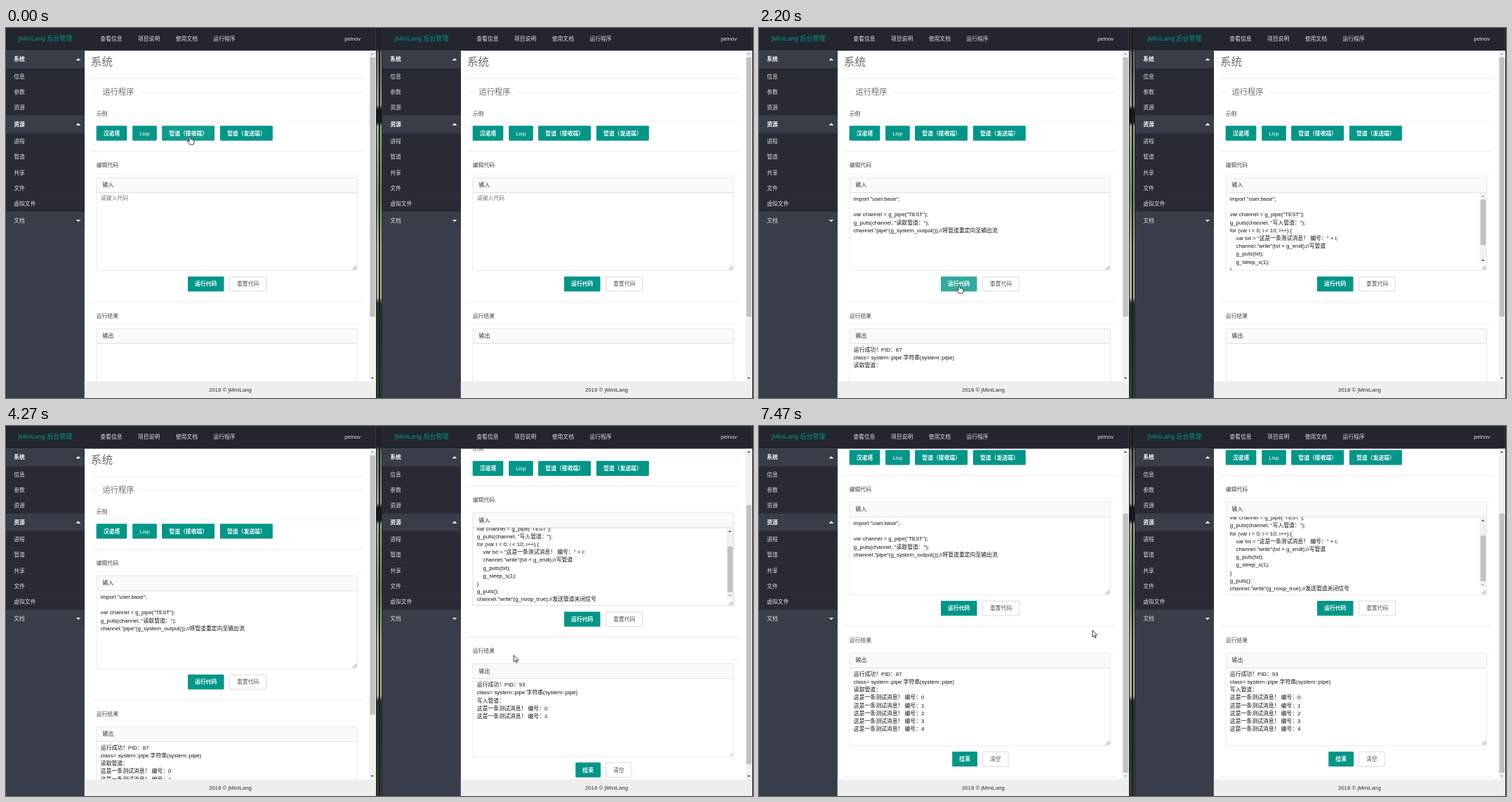
Recreate the animation shown at these times as an HTML page. Size 1064 by 527 pixels, loop 8 s.

```html
<!DOCTYPE html>
<html lang="zh-CN">
<head>
<meta charset="utf-8">
<title>jMiniLang 后台管理</title>
<style>
html, body { margin: 0; width: 100%; height: 100%; overflow: hidden; background: #17191d; }
#stage { position: relative; width: 1064px; height: 527px; overflow: hidden; }
#stage div, #stage pre { position: absolute; box-sizing: border-box; margin: 0; white-space: pre; }
.panel { top: 0; width: 942px; height: 945px; overflow: hidden; background: #fff; transform-origin: 0 0;
  font: 14px/20px "Liberation Sans", Arial, "Noto Sans CJK SC", "Noto Sans CJK", sans-serif; color: #333; }
.head { width: 942px; height: 60px; background: #23262e; color: #dfe0e2; line-height: 60px; }
.logo { width: 200px; text-align: center; font-size: 16px; color: #009688; }
.side { top: 60px; width: 200px; height: 885px; background: #393d49; color: #dcdde0; }
.side div { width: 200px; padding-left: 20px; line-height: 40px; height: 40px; background: #282b33; }
.side .top { height: 45px; line-height: 45px; background: #393d49; }
.side .open { color: #fff; font-weight: bold; }
.top::after { content: ""; position: absolute; left: 178px; top: 20px; border: 6px solid transparent; border-top-color: #dcdde0; }
.open::after { top: 13px; border-color: transparent transparent #fff; }
.body { left: 200px; top: 60px; width: 742px; height: 842px; overflow: hidden; }
.page { width: 725px; height: 1030px; }
.line { left: 15px; width: 695px; height: 1px; background: #dedede; }
.faint { background: #ececec; }
.h1 { left: 16px; top: 10px; font-size: 28px; line-height: 40px; font-weight: 300; color: #6c6c6c; }
.legend { left: 36px; top: 90px; padding: 0 10px; font-size: 20px; line-height: 30px; font-weight: 300; color: #6c6c6c; background: #fff; }
.title { left: 30px; line-height: 42px; color: #444; }
.label { left: 30px; width: 665px; height: 39px; padding-left: 15px; line-height: 37px; background: #fafafa; border: 1px solid #dcdcdc; }
.area { left: 30px; width: 665px; height: 199px; overflow: hidden; border: 1px solid #dcdcdc; }
.area pre { left: 10px; top: 5px; font: inherit; color: #111; }
.area pre.hint { top: 4px; color: #757575; }
.grip { right: 1px; bottom: 1px; width: 11px; height: 11px;
  background: linear-gradient(135deg, transparent 49%, #888 49% 57%, transparent 57% 72%, #888 72% 80%, transparent 80%); }
.btn { height: 38px; line-height: 38px; border-radius: 2px; text-align: center; background: #009688; color: #fff; font-weight: bold; }
.plain { background: #fff; color: #555; font-weight: normal; border: 1px solid #bdbdbd; line-height: 36px; }
.latin { font-weight: normal; }
.bar { width: 17px; background: #f1f1f1; }
.thumb { left: 2px; top: 17px; width: 13px; background: #c1c1c1; }
.up, .down { left: 4px; border: 4.5px solid transparent; }
.up { top: 2px; border-bottom-color: #444; }
.down { bottom: 2px; border-top-color: #444; }
.up.off { border-bottom-color: #a3a3a3; }
.down.off { border-top-color: #a3a3a3; }
.foot { left: 200px; top: 902px; width: 742px; height: 44px; line-height: 44px; text-align: center; background: #eee; }
#gap { left: 527px; width: 9px; height: 527px; background:
  linear-gradient(90deg, #15171a 0 1px, transparent 1px 4px, #1b1e1c 4px 6px, transparent 6px 8px, #24272d 8px),
  linear-gradient(#23262e 0 30px, #6d7068 34px, #9a9b94 110px, #121512 116px 134px, #a3aa8c 140px, #7e8a66 240px, #b4b894 310px 384px, #2b302c 392px, #3a3f3b 100%); }
#cursor { position: absolute; left: 0; top: 0; overflow: visible; }
#cursor path { display: none; fill: #fff; stroke: #111; stroke-width: .8; stroke-linejoin: round; }
</style>
</head>
<body>
<div id="stage">
  <div id="gap"></div>
  <svg id="cursor" width="1" height="1">
    <path id="arrow" d="M0 0V9.4L2.2 7.4L3.7 10.8L5.1 10.2L3.6 6.9H6.6Z"/>
    <path id="beam" style="fill:none" d="M-2.4 -5.5H-.6L0 -5L.6 -5.5H2.4M0 -5V5M-2.4 5.5H-.6L0 5L.6 5.5H2.4"/>
    <path id="hand" d="M-1 .9Q0 -.6 1 .9V4.5L2.6 4.8L4.4 5.3L6 6.1V9L5 12H-.6L-3.8 7.8Q-3.6 6.2 -2.2 6.9L-1 8Z"/>
  </svg>
</div>
<script>
const LOOP = 8000, FPS = 15, SCALE = 0.5594, PAGE_MAX = 187.7, AREA_MAX = 54;
const stage = document.getElementById('stage');
const cursor = document.getElementById('cursor');

const box = (cls, text = '', style = '', key = '') =>
  `<div class="${cls}" style="${style}" data-key="${key}">${text}</div>`;
const btn = (text, x, y, w, cls = '', key = '') =>
  box('btn ' + cls, text, `left:${x}px;top:${y}px;width:${w}px`, key);
const line = (y, cls = '') => box('line ' + cls, '', `top:${y}px`);
const bar = (key, x, h, thumb) => box('bar',
  box('up') + box('thumb', '', `height:${thumb}px`) + box('down'), `left:${x}px;top:0;height:${h}px`, key);

function card(y, title, label, key) {
  return line(y) + box('title', title, `top:${y + 15}px`) + line(y + 57, 'faint') +
    box('label', label, `top:${y + 68}px`) +
    box('area', `<pre></pre>${key === 'code' ? bar('codeBar', 646, 180, 116) : ''}<div class="grip"></div>`,
      `top:${y + 106}px`, key);
}

function sideNav() {
  const groups = [['系统', '信息', '参数', '资源'], ['资源', '进程', '管道', '共享', '文件', '虚拟文件'], ['文档']];
  let y = 0, html = '';
  for (const [name, ...items] of groups) {
    html += box(items.length ? 'top open' : 'top', name, `top:${y}px`);
    y += 45;
    for (const item of items) {
      html += box('', item, `top:${y}px`);
      y += 40;
    }
  }
  return box('side', html);
}

function makePanel(x) {
  const menu = ['查看信息', '项目说明', '使用文档', '运行程序'];
  const page = box('h1', '系统') + line(70) + line(105) + box('legend', '运行程序') +
    box('title', '示例', 'top:139px') + line(181, 'faint') +
    btn('汉诺塔', 30, 191, 78) + btn('Lisp', 121.9, 191, 61.7, 'latin') +
    btn('管道（接收端）', 197.4, 191, 134, '', 'receive') + btn('管道（发送端）', 345, 191, 134, '', 'send') +
    card(255, '编辑代码', '输入', 'code') +
    btn('运行代码', 263, 575, 92, '', 'run') + btn('重置代码', 369, 575, 94, 'plain') +
    card(639, '运行结果', '输出', 'out') +
    btn('结束', 292, 959, 64) + btn('清空', 369, 959, 66, 'plain') + line(1023);
  const el = document.createElement('div');
  el.className = 'panel';
  el.style.transform = `translate(${x}px,-1.2px) scale(${SCALE})`;
  el.innerHTML = box('head', box('logo', 'jMiniLang 后台管理') +
      menu.map((m, i) => box('', m, `left:${240 + 96 * i}px`)).join('') + box('', 'pelnov', 'left:862px')) +
    sideNav() + box('body', box('page', page, '', 'page') + bar('pageBar', 725, 842, 660)) +
    box('foot', '2018 © jMiniLang');
  stage.insertBefore(el, cursor);
  const parts = {};
  el.querySelectorAll('[data-key]').forEach(n => { if (n.dataset.key) parts[n.dataset.key] = n; });
  return parts;
}

const readCode = `import "user.base";

var channel = g_pipe("TEST");
g_puts(channel, "读取管道：");
channel."pipe"(g_system_output());//将管道重定向至输出流`;

const writeCode = `import "user.base";

var channel = g_pipe("TEST");
g_puts(channel, "写入管道：");
for (var i = 0; i < 10; i++) {
    var txt = "这是一条测试消息！ 编号：" + i;
    channel."write"(txt + g_endl);//写管道
    g_puts(txt);
    g_sleep_s(1);
}
g_puts();
channel."write"(g_noop_true);//发送管道关闭信号`;

const sent = [2930, 4000, 5130, 6190, 7330];
const panels = [
  { ui: makePanel(0), code: readCode, codeAt: 330, runAt: 2195, pid: 87, verb: '读取',
    msgs: sent.map(t => t + 135), scrollAt: 5225,
    hover: { receive: [-100, 330], run: [1800, 2270] }, focus: { out: [5330, 5650] } },
  { ui: makePanel(536), code: writeCode, codeAt: 1130, runAt: 2860, pid: 93, verb: '写入',
    msgs: sent, scrollAt: 4158, areaAt: 3523,
    hover: { send: [800, 1460], run: [2600, 3450] }, focus: { code: [3500, 4190], out: [4330, 4880] } }
];

// time, x, y, shape held until the next entry
const path = [
  [0, 262, 154, 'hand'], [330, 262, 154, 'arrow'], [800, 858, 155, 'hand'], [930, 867, 154, 'hand'],
  [1400, 867, 154, 'arrow'], [1860, 285, 366, 'hand'], [2260, 285, 366, 'arrow'], [2660, 819, 366, 'hand'],
  [3400, 819, 366, 'arrow'], [3530, 756, 340, 'beam'], [3600, 716, 314, 'beam'], [4190, 716, 314, 'arrow'],
  [4390, 738, 352, 'beam'], [4530, 744, 359, 'beam'], [4730, 744, 359, 'arrow'], [5130, 446, 365, 'arrow'],
  [5260, 468, 363, 'beam'], [5400, 484, 362, 'beam'], [5530, 484, 362, 'beam'], [5660, 482, 344, 'arrow'],
  [5930, 478, 294, 'arrow'], [6120, 478, 294, 'arrow'], [6200, 475, 291, 'arrow'], [LOOP, 475, 291, 'arrow']
];

const clamp = u => Math.min(1, Math.max(0, u));
const easeOut = u => 1 - (1 - clamp(u)) ** 3;
const smooth = u => u * u * (3 - 2 * u);
const fade = (t, [on, off]) => clamp((t - on) / 300) * (1 - clamp((t - off) / 300));

function setText(el, text) {
  if (el.textContent !== text) el.textContent = text;
}

function setBar(el, pos, travel) {
  const [up, thumb, down] = el.children;
  thumb.style.transform = `translateY(${pos * travel}px)`;
  up.classList.toggle('off', pos <= 0);
  down.classList.toggle('off', pos >= 1);
}

function drawPanel(p, t) {
  const { ui } = p;
  const loaded = t >= p.codeAt;
  const code = ui.code.firstChild;
  setText(code, loaded ? p.code : '请输入代码');
  code.classList.toggle('hint', !loaded);

  const area = p.areaAt ? easeOut((t - p.areaAt) / 220) : 0;
  code.style.transform = `translateY(${-area * AREA_MAX}px)`;
  ui.codeBar.style.display = loaded && p.areaAt ? '' : 'none';
  setBar(ui.codeBar, area, 30);

  const out = t < p.runAt ? [] : [`运行成功！PID：${p.pid}`, 'class= system::pipe 字符串(system::pipe)', `${p.verb}管道：`];
  p.msgs.forEach((at, i) => { if (t >= at) out.push(`这是一条测试消息！ 编号：${i}`); });
  setText(ui.out.firstChild, out.join('\n'));

  const scroll = easeOut((t - p.scrollAt) / 230);
  ui.page.style.transform = `translateY(${-scroll * PAGE_MAX}px)`;
  setBar(ui.pageBar, scroll, 148);

  for (const key in p.hover) ui[key].style.opacity = 1 - 0.2 * fade(t, p.hover[key]);
  for (const key in p.focus) {
    const c = 220 - 30 * fade(t, p.focus[key]);
    ui[key].style.borderColor = `rgb(${c},${c},${c})`;
  }
}

function drawCursor(t) {
  const i = path.findIndex((k, n) => n > 0 && t < k[0]);
  const [t0, x0, y0, shape] = path[i - 1], [t1, x1, y1] = path[i];
  const u = smooth((t - t0) / (t1 - t0));
  cursor.style.transform = `translate(${x0 + (x1 - x0) * u}px,${y0 + (y1 - y0) * u}px)`;
  for (const el of cursor.children) el.style.display = el.id === shape ? 'inline' : 'none';
}

const start = performance.now();
function tick() {
  const now = Math.max(0, performance.now() - start) % LOOP;
  const t = Math.min(LOOP - 1, Math.floor((now + 4) * FPS / 1000) * 1000 / FPS);
  panels.forEach(p => drawPanel(p, t));
  drawCursor(t);
  requestAnimationFrame(tick);
}
tick();
</script>
</body>
</html>
```
